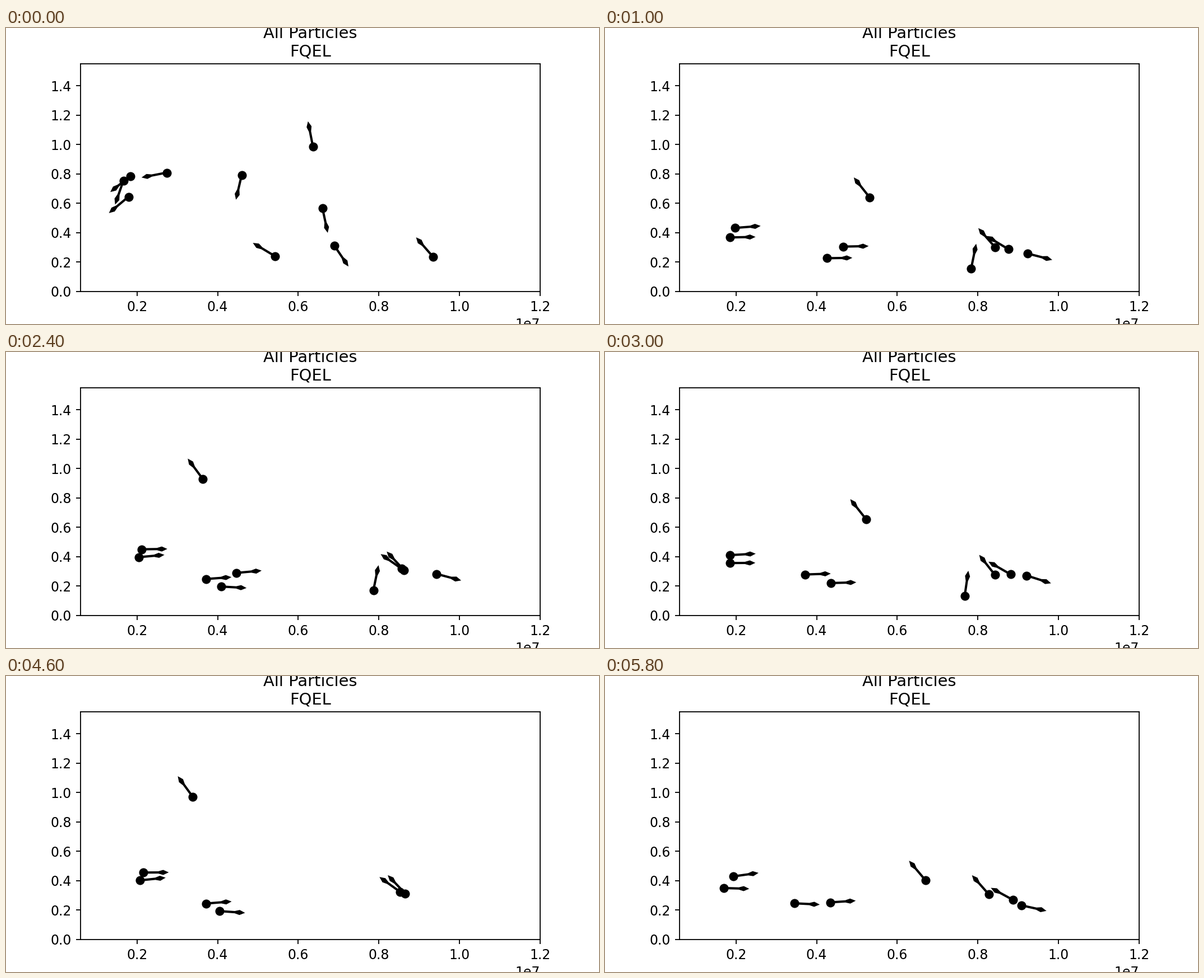
These frames come from a looping animation (1058 px wide and 529 px high, 6000 ms). A matplotlib script:

```python
import numpy as np
import matplotlib.pyplot as plt
from matplotlib.animation import FuncAnimation

W, H, DPI = 1058, 529, 165.3125
FRAMES, STEP = 30, 200
LEFT, RIGHT, TOP, BOTTOM = 133, 953, 64, 471  # plot edges in pixels
SETTLE = 5      # frames until a particle reaches its home
PERIOD = 11.2   # frames per swing around home
BELOW = 540     # height of a particle that has sunk out of view

# x, y and heading in degrees of each particle, first and after settling
START = np.array([
    (209, 272, 251), (221, 264, 219), (218, 301, 220), (286, 258, 191),
    (420, 262, 257), (547, 211, 101), (564, 321, 282), (585, 388, 304),
    (479, 407, 149), (761, 408, 131)], float)
HOME = np.array([
    (225, 372, 2), (235, 355, 4), (348, 405, 1), (392, 412, 0),
    (422, 390, 2), (452, 290, 128), (655, 428, 78), (698, 390, 132),
    (716, 393, 148), (756, 402, -14)], float)
ROVER = 5  # the one particle that keeps swinging widely
AWAY = {0: (16, 20), 2: (2, 6), 3: (16, 20), 4: (15, 30),
        6: (20, 30), 8: (7, 10), 9: (21, 25)}

rng = np.random.default_rng(4)
count = len(START)
phase = rng.uniform(0, 2 * np.pi, (count, 3))
swing = np.tile([14.0, 8.0, 4.0], (count, 1))
swing[ROVER] = 120, 75, 2
phase[ROVER] = -2 * np.pi * 12 / PERIOD + np.pi

path = HOME - START
path[:, 2] = (path[:, 2] + 180) % 360 - 180


def smooth(u):
    u = np.clip(u, 0, 1)
    return u * u * (3 - 2 * u)


def state(t):
    wave = swing * np.cos(2 * np.pi * t / PERIOD + phase)
    s = START + path * smooth(t / SETTLE) + wave * smooth(t / 16)
    for k, (gone, back) in AWAY.items():
        sunk = np.interp(t, [gone - 1, gone, back, back + 1], [0, 1, 1, 0])
        s[k, 1] += (BELOW - s[k, 1]) * sunk
    return s


plt.rcParams.update({"font.size": 10.3, "axes.titlesize": 12.6})
fig = plt.figure(figsize=(W / DPI, H / DPI), dpi=DPI)
ax = fig.add_axes([LEFT / W, 1 - BOTTOM / H,
                   (RIGHT - LEFT) / W, (BOTTOM - TOP) / H])
ax.set_xlim(0.6e6, 1.2e7)
ax.set_ylim(0, 1.55)
ax.set_title("All Particles\nFQEL")
to_data = ax.transData.inverted()


def place(s):
    pixels = np.column_stack([s[:, 0] + 0.5, H - 0.5 - s[:, 1]])
    angle = np.radians(s[:, 2])
    return to_data.transform(pixels), np.cos(angle), np.sin(angle)


xy, u, v = place(state(0))
dots = ax.scatter(*xy.T, color="black")
arrows = ax.quiver(*xy.T, u, v, color="black", scale=18, width=0.005,
                   headwidth=2.2, headlength=2.4, headaxislength=4.5)


def draw(frame):
    xy, u, v = place(state(frame))
    dots.set_offsets(xy)
    arrows.set_offsets(xy)
    arrows.set_UVC(u, v)
    return dots, arrows


anim = FuncAnimation(fig, draw, frames=FRAMES, interval=STEP,
                     repeat=True, repeat_delay=0, blit=False)
plt.show()
```
